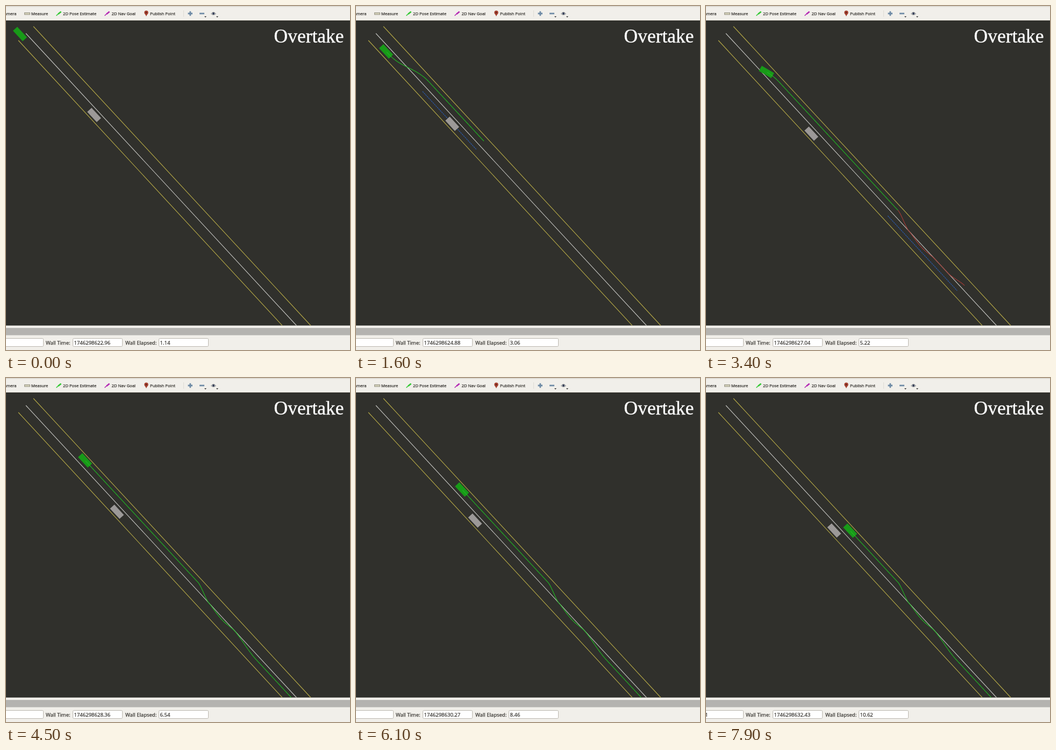
These frames come from a looping animation (640x640 px, 8 s). An HTML page:

```html
<!DOCTYPE html>
<html lang="en">
<head>
<meta charset="utf-8">
<title>Overtake</title>
<style>
  html, body { margin: 0; width: 100%; height: 100%; overflow: hidden; background: #f1efea; }
  svg { display: block; width: 100vw; height: 100vh; }
  .ui { font-family: "Open Sans", "Noto Sans", sans-serif; fill: #35332f; stroke: #35332f; stroke-width: .25; }
  .tools { font-size: 7.7px; }
  .status { font-size: 9.5px; }
  .title { font: 35.5px "Liberation Serif", "Times New Roman", serif; fill: #fff; stroke: #fff; stroke-width: .4; }
  .field { fill: #fff; stroke: #bab6ae; }
  .trace { fill: none; stroke-width: 1.15; stroke-linejoin: round; }
</style>
</head>
<body>
<svg viewBox="0 0 640 640">
  <defs><clipPath id="view"><rect y="27" width="640" height="567.5"/></clipPath></defs>
  <rect width="640" height="640" fill="#f1efea"/>
  <rect width="640" height="1.5" fill="#d9d6cf"/>
  <rect y="26" width="640" height="1" fill="#d5d2ca"/>

  <g class="ui tools">
    <text x="19.5" y="17" text-anchor="end">Focus Camera</text>
    <text x="47" y="17">Measure</text>
    <text x="106" y="17">2D Pose Estimate</text>
    <text x="196.5" y="17">2D Nav Goal</text>
    <text x="268" y="17">Publish Point</text>
  </g>
  <rect x="34.5" y="12.5" width="10" height="3.5" fill="#d2cfb8" stroke="#858273" stroke-width=".8"/>
  <g fill="none" stroke-width="1.6">
    <path d="M93.5 18L98 14" stroke="#35c935"/><path d="M97 15L102.5 10.5" stroke="#35c935" stroke-width="2.8"/>
    <path d="M183.5 18L188 14" stroke="#b42bb4"/><path d="M187 15L192.5 10.5" stroke="#b42bb4" stroke-width="2.8"/>
  </g>
  <path d="M261 19.5C260 16 257.3 15 257.3 12.3A3.7 3.7 0 0 1 264.7 12.3C264.7 15 262 16 261 19.5Z" fill="#a5402f"/>
  <circle cx="261" cy="12.3" r="1.3" fill="#5c2119"/>
  <path d="M330.5 8V20" stroke="#dedbd4"/>
  <path d="M338.5 14H347M342.8 9.8V18.2" stroke="#6f8ba6" stroke-width="2.8"/>
  <path d="M360 14H369" stroke="#6f8ba6" stroke-width="2.8"/>
  <path d="M381.5 14.5Q386 8.5 390.5 14.5Q386 18.5 381.5 14.5Z" fill="#c9ccd0" stroke="#777" stroke-width=".8"/>
  <circle cx="386" cy="14" r="2" fill="#333d55"/>
  <path d="M369 19h4l-2 2.5zM391 19h4l-2 2.5z" fill="#444"/>

  <rect y="27" width="640" height="567.5" fill="#30302c"/>
  <g clip-path="url(#view)">
    <g fill="none" stroke-width="1.15">
      <path d="M51 38L567 594.5M23 64L514 594.5" stroke="#b0a445"/>
      <path d="M37 51L540.5 594.5" stroke="#c0c0bd"/>
    </g>
    <path id="blue" class="trace" stroke="#2a5bb0" stroke-dasharray="3 1"/>
    <rect id="slow" x="-13" y="-5.5" width="26" height="11" fill="#9c9998"/>
    <rect id="ego" x="-13.3" y="-5.5" width="26.6" height="11" fill="#189a18"/>
    <path id="red" class="trace" stroke="#a33a35"/>
    <path id="green" class="trace" stroke="#20b622"/>
  </g>
  <text class="title" x="498.5" y="67.5">Overtake</text>

  <rect y="599" width="640" height="13.5" fill="#b4b3b0"/>
  <rect class="field" x="-6.5" y="618.5" width="76" height="15" rx="2"/>
  <rect class="field" x="124.5" y="618.5" width="92" height="15" rx="2"/>
  <rect class="field" x="284.5" y="618.5" width="92" height="15" rx="2"/>
  <g class="ui status">
    <text x="74" y="630">Wall Time:</text>
    <text x="222" y="630">Wall Elapsed:</text>
    <text id="rosElapsed" x="-20.5" y="630"></text>
    <text id="wallTime" x="126.5" y="630"></text>
    <text id="wallElapsed" x="286.5" y="630"></text>
  </g>
</svg>
<script>
const LOOP = 8, STEP = .1;
const PLAN = .9, REPLAN = 2.9, ACCEPT = 4;      // seconds
const SWERVE_X = 357, TRIAL_END = 482, ROUTE_END = 531;

const $ = id => document.getElementById(id);
const progress = (a, b, x) => Math.min(1, Math.max(0, (x - a) / (b - a)));
const ease = (a, b, x) => { const u = progress(a, b, x); return u * u * (3 - 2 * u); };

// Routes are y as a function of x, measured from the road's middle line.
const middle = x => 51 + (x - 37) * 1.0795;
const laneCenter = x => middle(x) + 14.2;
const straight = x => middle(x) + 13 - 29.5 * ease(60, 136, x);
const swerve = x => straight(x) + 16.5 * ease(SWERVE_X, 378, x)
                  + 5 * Math.sin(Math.PI * progress(374, 428, x)) ** 2;
const weave = x => swerve(x) + 10.5 * ease(422, 465, x);
const trial = x => swerve(x) - 11 * ease(448, 486, x);

// The green car speeds up twice.
const egoX = t => 26 + 18.75 * t + 12.65 * Math.max(0, t - 1.6) + 8 * Math.max(0, t - 6.1);
const planFront = t => Math.min(70 + 240 * (t - PLAN), 402 + 72 * (t - 2.3), TRIAL_END);

function trace(id, from, to, route) {
  let d = "";
  for (let x = from; x < to; x += 2) d += `${d ? "L" : "M"}${x.toFixed(2)} ${route(x).toFixed(2)}`;
  if (d) d += `L${to.toFixed(2)} ${route(to).toFixed(2)}`;
  $(id).setAttribute("d", d);
}

function place(id, x, y, slope) {
  $(id).setAttribute("transform", `translate(${x} ${y}) rotate(${Math.atan(slope) * 180 / Math.PI})`);
}

function draw(t) {
  const x = egoX(t);
  place("ego", x, weave(x), (weave(x + 5) - weave(x - 5)) / 10);
  place("slow", 164 + 9.43 * t, 202.7 + 10.25 * t, 1.08);

  const front = planFront(t);
  const planning = t >= PLAN && t < ACCEPT;
  const replanning = t >= REPLAN && t < ACCEPT;
  const greenEnd = t < PLAN ? 0 : t < REPLAN ? front : t < ACCEPT ? SWERVE_X : ROUTE_END;
  trace("green", x + 1, greenEnd, t < REPLAN ? straight : weave);
  trace("red", SWERVE_X, replanning ? front : 0, trial);
  trace("blue", front - Math.min(143, .48 * front), planning ? front - 14 : -Infinity, laneCenter);

  const elapsed = 1.14 + 1.2 * t;
  $("wallElapsed").textContent = elapsed.toFixed(2);
  $("rosElapsed").textContent = (elapsed - .01).toFixed(2);
  $("wallTime").textContent = (1746298622.96 + 1.199 * t).toFixed(2);
}

const start = performance.now();
function tick() {
  const t = (performance.now() - start) / 1000 % LOOP;
  draw(Math.floor(t / STEP) * STEP);
  requestAnimationFrame(tick);
}
tick();
</script>
</body>
</html>
```
